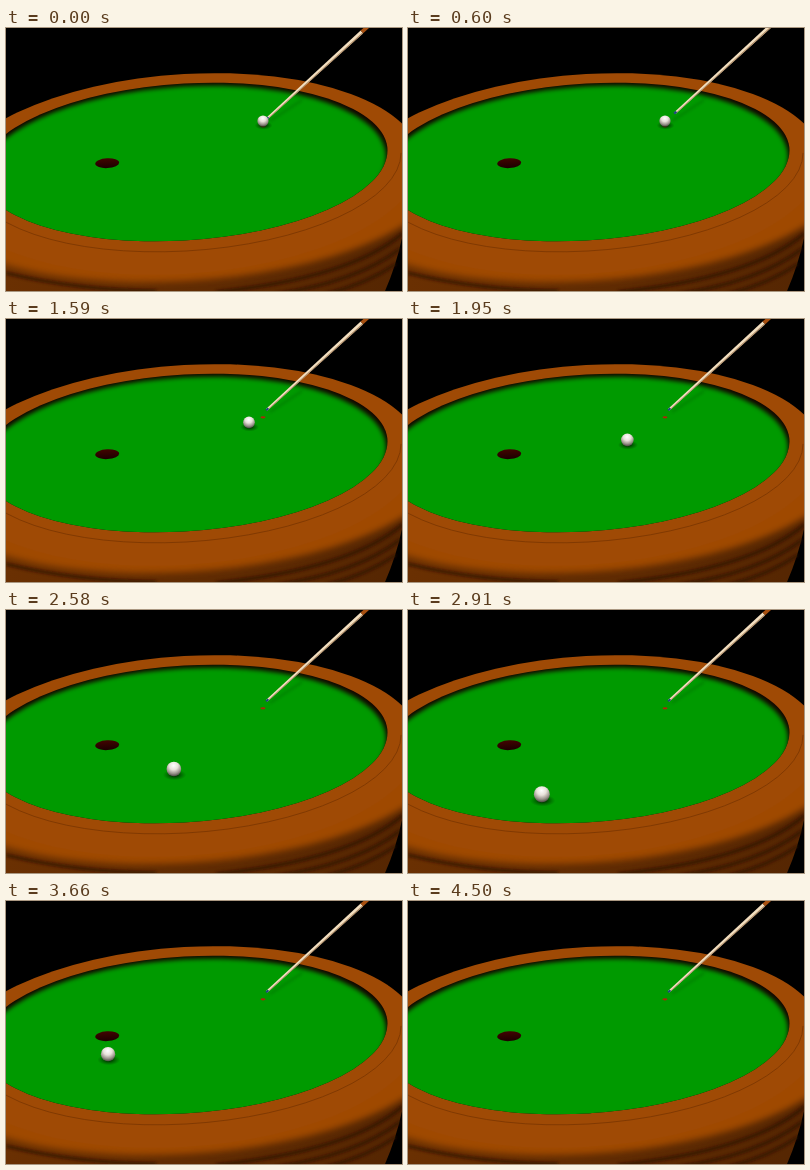
Write an HTML page that moves like this. It is 396 px wide and 263 px high and loops after 4.53 s.

```html
<!DOCTYPE html>
<html>
<head>
<meta charset="utf-8">
<title>Elliptical billiards</title>
<style>
  html, body { margin: 0; width: 100%; height: 100%; overflow: hidden; background: #000; }
  svg { display: block; width: 396px; height: 263px; }
</style>
</head>
<body>
<svg viewBox="0 0 396 263">
  <defs>
    <radialGradient id="ivory" cx=".48" cy=".26" r=".74">
      <stop offset="0" stop-color="#fff"/>
      <stop offset=".4" stop-color="#e8e2da"/>
      <stop offset=".75" stop-color="#99928a"/>
      <stop offset="1" stop-color="#484840"/>
    </radialGradient>
    <radialGradient id="shade">
      <stop offset=".3" stop-color="#002800" stop-opacity=".75"/>
      <stop offset="1" stop-color="#004800" stop-opacity="0"/>
    </radialGradient>
    <linearGradient id="body" x2="1">
      <stop offset="0" stop-color="#6a3002"/>
      <stop offset="1" stop-color="#552602"/>
    </linearGradient>
    <linearGradient id="pit" x2="0" y2="1">
      <stop offset="0" stop-color="#420400"/>
      <stop offset="1" stop-color="#1c0000"/>
    </linearGradient>
    <filter id="soft" x="-20%" y="-20%" width="140%" height="140%"><feGaussianBlur stdDeviation="1.4"/></filter>
    <filter id="felt"><feGaussianBlur stdDeviation="2"/></filter>
    <filter id="lip" y="40%" height="80%"><feGaussianBlur stdDeviation="3"/></filter>
    <clipPath id="opening"><ellipse rx="203.5" ry="78.5" transform="translate(178 134) skewY(-3.2)"/></clipPath>
    <clipPath id="mouth"><path d="M80 60H122V134H113A12 5 -3 0 1 89.5 136H80Z"/></clipPath>
  </defs>

  <!-- table body and rim -->
  <path d="M0 190L396 150V210Q390 238 379 263H0Z" fill="url(#body)"/>
  <g fill="none" stroke="#2a1100" stroke-width="3" opacity=".75" filter="url(#soft)">
    <path d="M397 205Q345 250 210 264"/>
    <path d="M394 221Q350 254 270 266"/>
    <path d="M390 236Q360 256 320 266"/>
    <path d="M0 245Q70 262 150 263"/>
  </g>
  <ellipse rx="258" ry="94" transform="translate(180 159) skewY(-3.2)" fill="#9f4a05" filter="url(#lip)"/>
  <ellipse rx="236" ry="100" transform="translate(178 146) skewY(-3.2)" fill="#9f4a05"/>
  <path d="M215 0A215 86 0 0 1 -215 0" transform="translate(180 137) skewY(-3.2)" fill="none" stroke="#7a3602" stroke-width=".8"/>

  <!-- playing surface -->
  <g clip-path="url(#opening)">
    <rect width="396" height="263" fill="#120600"/>
    <ellipse rx="203" ry="82" transform="translate(177 140.5) skewY(-3.2)" fill="#009a00" filter="url(#felt)"/>
    <ellipse cx="101.2" cy="135.2" rx="12" ry="4.9" transform="rotate(-3 101 135)" fill="url(#pit)"/>
    <ellipse cx="257" cy="98.3" rx="2.5" ry="1.1" fill="#a82a08"/>
    <path d="M264 93L296 72" stroke="#003c00" stroke-width="1.5" opacity=".3" filter="url(#soft)"/>
  </g>

  <g id="cue">
    <path d="M260 90L354.6 2.6L357.2 5.2L261.5 91.5Z" fill="#f3dfc0"/>
    <path d="M261.5 91.5L357.2 5.2L356.4 4.4L261 91Z" fill="#a98662"/>
    <path d="M354.6 2.6L374 -15.3L377 -12.6L357.2 5.2Z" fill="#a85010"/>
    <path d="M260.2 91.2L262.4 89.2" stroke="#1d4a80" stroke-width="2.2"/>
  </g>

  <g clip-path="url(#opening)">
    <g id="ballClip">
      <ellipse id="shadow" cx=".1" cy=".8" rx="1.6" ry=".75" fill="url(#shade)"/>
      <circle id="ball" r="1" fill="url(#ivory)"/>
    </g>
  </g>
</svg>
<script>
const LOOP = 4530, STRIKE = 1350, BOUNCE = 3155, ARRIVE = 3950, DROP = 3890, GONE = 4090;
const START = [257, 93], CUSHION = [104.5, 206], HOLE = [101, 130];
const $ = id => document.getElementById(id);
const clamp = v => Math.max(0, Math.min(1, v));
const radiusAt = y => 5.6 + 0.026 * (y - 93);

// Constant speed on the table, seen in perspective
function roll(a, b, s) {
  const depth = radiusAt(a[1]) / radiusAt(b[1]);
  const u = s * depth / (1 - s + s * depth);
  return a.map((v, i) => v + (b[i] - v) * u);
}

function pullBack(t) {
  if (t < 900) return (1 - Math.cos(Math.PI * t / 900)) / 2;
  return 1 - clamp((t - 900) / (STRIKE - 900)) ** 2;
}

function draw(t) {
  const pull = 8 * pullBack(t);
  $("cue").setAttribute("transform", `translate(${pull} ${-0.92 * pull})`);

  const [x, y] = t < BOUNCE
    ? roll(START, CUSHION, clamp((t - STRIKE) / (BOUNCE - STRIKE)))
    : roll(CUSHION, HOLE, clamp((t - BOUNCE) / (ARRIVE - BOUNCE)));
  const falling = t > DROP;
  const drop = 20 * clamp((t - DROP) / (GONE - DROP)) ** 2;
  const r = radiusAt(y);
  $("ball").setAttribute("transform", `translate(${x} ${y + drop}) scale(${r})`);
  $("shadow").setAttribute("transform", `translate(${x} ${y}) scale(${r})`);
  $("shadow").style.display = falling ? "none" : "";
  $("ball").style.display = t < GONE ? "" : "none";
  $("ballClip").setAttribute("clip-path", falling ? "url(#mouth)" : "none");
}

function frame() {
  draw(performance.now() % LOOP);
  requestAnimationFrame(frame);
}
frame();
</script>
</body>
</html>
```
